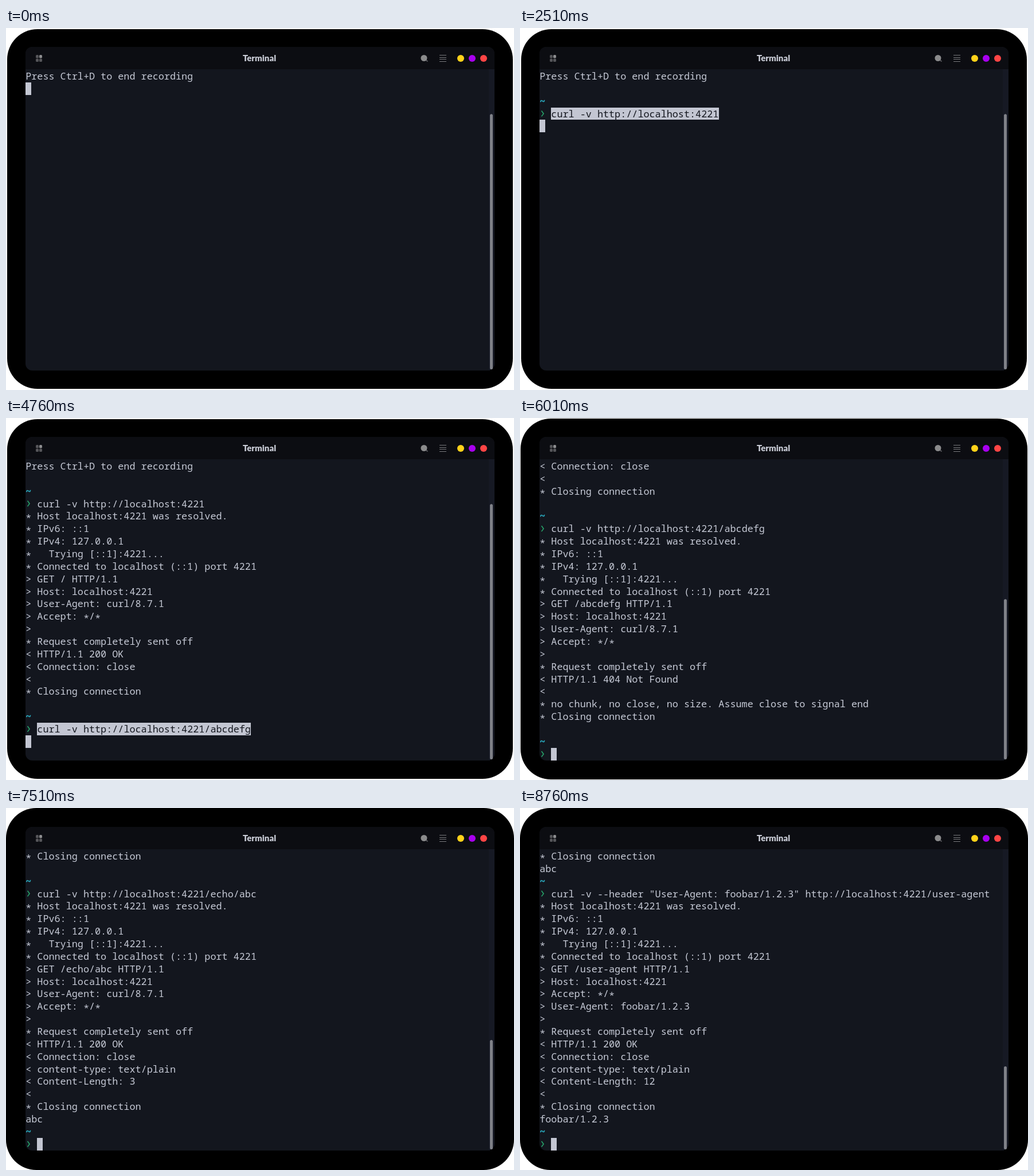
Animation, 886 px wide and 632 px high, one loop 9010 ms. Source, as an HTML page:

```html
<!DOCTYPE html>
<html lang="en">
<head>
<meta charset="utf-8">
<title>Terminal</title>
<style>
  html, body { margin: 0; width: 100%; height: 100%; overflow: hidden; background: #fff; }
  svg { display: block; width: 886px; height: 632px; }
  .title { font: 900 15px Lato, "Open Sans", sans-serif; fill: #c9ccd6; text-anchor: middle; }
  .term { font: 500 16.8px "Noto Sans Mono", "Liberation Mono", monospace; fill: #c6cad6; font-variant-ligatures: none; }
  .term text { white-space: pre; }
  .term .tilde { fill: #2aa9bd; stroke: #2aa9bd; stroke-width: 0.7; }
  .term .dark { fill: #13161e; }
  .block { fill: #c3c6d2; shape-rendering: crispEdges; }
  .arrow { fill: none; stroke: #26a269; stroke-width: 1.6; }
</style>
</head>
<body>
<svg viewBox="0 0 886 632">
  <rect id="shadow" fill="#000"/>
  <rect x="34" y="33" width="818" height="565" rx="12" fill="#13161e"/>
  <path d="M842 72h10v514a12 12 0 0 1-10 12z" fill="#161924"/>
  <path d="M34 72V45a12 12 0 0 1 12-12h794a12 12 0 0 1 12 12v27z" fill="#0c0d12"/>
  <g fill="#555559">
    <rect x="52" y="47" width="5" height="5.5" rx="1.5"/>
    <rect x="58" y="47" width="5" height="5.5" rx="1.5" fill="#8c8c8e"/>
    <rect x="52" y="53.5" width="5" height="5.5" rx="1.5"/>
    <rect x="58" y="53.5" width="5" height="5.5" rx="1.5"/>
  </g>
  <text class="title" x="442" y="58">Terminal</text>
  <path d="M732 55.500l3.500 3" stroke="#55565a" stroke-width="2"/>
  <circle cx="729" cy="52.500" r="5.500" fill="#8b8b8c"/>
  <path d="M756 47.500h12M756 51.500h12M756 54.500h12M756 58.500h12" stroke="#78797c"/>
  <circle cx="793" cy="53" r="6" fill="#ffd21a"/>
  <circle cx="813" cy="53" r="6" fill="#a800f0"/>
  <circle cx="833" cy="53" r="6" fill="#ff4545"/>
  <g id="term" class="term"></g>
  <rect id="thumb" x="844" width="5" rx="2.500" fill="#7f8188"/>
</svg>
<script>
const LOOP = 9010, ROWS = 24, LEFT = 34.2, TOP = 73, CELL_W = 10.08, CELL_H = 21.86;
const $ = id => document.getElementById(id);
const HOST = "localhost:4221";
const AGENT = "> User-Agent: curl/8.7.1", ACCEPT = "> Accept: */*";

function request(path, headers, reply) {
  return [
    `* Host ${HOST} was resolved.`,
    "* IPv6: ::1",
    "* IPv4: 127.0.0.1",
    "*   Trying [::1]:4221...",
    "* Connected to localhost (::1) port 4221",
    `> GET ${path} HTTP/1.1`,
    `> Host: ${HOST}`,
    ...headers,
    ">",
    "* Request completely sent off",
    ...reply
  ];
}

const ok = (...rest) => ["< HTTP/1.1 200 OK", "< Connection: close", ...rest];
const body = text => ok("< content-type: text/plain", `< Content-Length: ${text.length}`,
  "<", "* Closing connection", text);

const runs = [
  { cmd: `curl -v http://${HOST}`,
    out: request("/", [AGENT, ACCEPT], ok("<", "* Closing connection", "")) },
  { cmd: `curl -v http://${HOST}/abcdefg`,
    out: request("/abcdefg", [AGENT, ACCEPT], ["< HTTP/1.1 404 Not Found", "<",
      "* no chunk, no close, no size. Assume close to signal end", "* Closing connection", ""]) },
  { cmd: `curl -v http://${HOST}/echo/abc`,
    out: request("/echo/abc", [AGENT, ACCEPT], body("abc")) },
  { cmd: `curl -v --header "User-Agent: foobar/1.2.3" http://${HOST}/user-agent`,
    out: request("/user-agent", [ACCEPT, "> User-Agent: foobar/1.2.3"], body("foobar/1.2.3")) }
];

// [start time, finished runs, phase of the current prompt]
const steps = [
  [0, 0, "start"], [500, 0, "idle"],
  [2260, 0, "pasted"], [2510, 0, "entered"], [2760, 1, "idle"],
  [4510, 1, "pasted"], [4760, 1, "entered"], [5010, 2, "idle"],
  [6260, 2, "entered"], [6510, 3, "idle"],
  [7760, 3, "pasted"], [8010, 3, "entered"], [8260, 4, "idle"]
];

function screen(done, phase) {
  const lines = [{ text: "Press Ctrl+D to end recording" }];
  if (phase === "start") return { lines, row: 1, col: 0 };
  lines.push({ text: "" });
  const prompt = (cmd, marked) => lines.push({ text: "~", tilde: true }, { text: cmd, prompt: true, marked });
  for (const run of runs.slice(0, done)) {
    prompt(run.cmd);
    lines.push(...run.out.map(text => ({ text })));
  }
  const cmd = phase === "idle" ? "" : runs[done].cmd;
  prompt(cmd, cmd !== "");
  const row = lines.length - 1;
  return phase === "entered" ? { lines, row: row + 1, col: 0 } : { lines, row, col: 2 + cmd.length };
}

const escapeText = s => s.replace(/&/g, "&amp;").replace(/</g, "&lt;").replace(/>/g, "&gt;");

// Asterisks sit on the middle of the line.
function spans(text) {
  let low = 0;
  return text.split(/(\*)/).filter(Boolean).map(part => {
    const want = part === "*" ? 4 : 0, dy = want - low;
    low = want;
    return `<tspan dy="${dy}">${escapeText(part)}</tspan>`;
  }).join("");
}

const block = (col, y, count) =>
  `<rect class="block" x="${LEFT + col * CELL_W}" y="${y}" width="${count * CELL_W}" height="${CELL_H}"/>`;

function drawLine(line, y) {
  const col = line.prompt ? 2 : 0;
  let svg = "";
  if (line.prompt) svg += `<path class="arrow" d="M37.500 ${y + 6}l3.600 4.900l-3.600 4.900"/>`;
  if (line.marked) svg += block(col, y, line.text.length);
  if (line.text) {
    const style = line.tilde ? "tilde" : line.marked ? "dark" : "";
    svg += `<text class="${style}" x="${LEFT + col * CELL_W}" y="${y + 17}">${spans(line.text)}</text>`;
  }
  return svg;
}

function setBox(el, box) {
  for (const key in box) el.setAttribute(key, box[key]);
}

function draw(done, phase) {
  const { lines, row, col } = screen(done, phase);
  const scroll = Math.max(0, row - ROWS + 1);
  const rowY = i => TOP + (i - scroll) * CELL_H;
  $("term").innerHTML = lines.map((line, i) => i < scroll ? "" : drawLine(line, rowY(i))).join("")
    + block(col, rowY(row), 1);
  const height = 12033 / (27 + scroll);
  setBox($("thumb"), { y: 596 - height, height });
}

let shown = -1;
function update(t) {
  const index = steps.findLastIndex(step => step[0] <= t);
  if (index !== shown) {
    draw(steps[index][1], steps[index][2]);
    shown = index;
  }
  const inset = t < 5010 ? 2 : t < 7010 ? 1 : 0;
  setBox($("shadow"), { x: inset, y: inset, width: 886 - 2 * inset, height: 632 - 2 * inset, rx: 53 });
}

const origin = performance.now();
function tick() {
  update((performance.now() - origin) % LOOP);
  requestAnimationFrame(tick);
}
tick();
</script>
</body>
</html>
```
